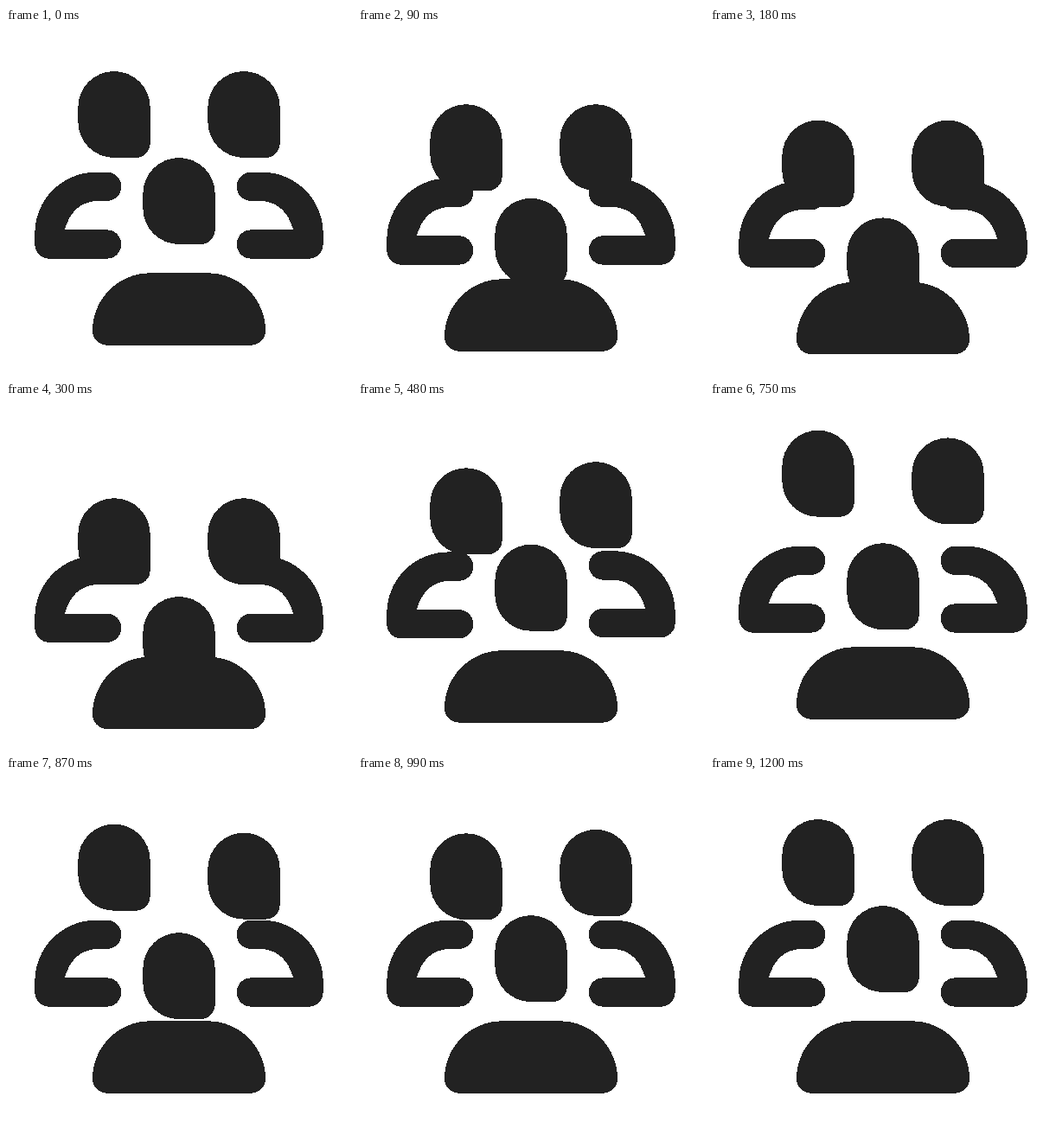
Write an HTML page that moves like this. It is 400 px wide and 400 px high and loops after 3230 ms.

```html
<!DOCTYPE html>
<html lang="en">
<head>
<meta charset="utf-8">
<title>People</title>
<style>
html, body { margin: 0; width: 100%; height: 100%; overflow: hidden; background: #fff; }
svg { display: block; width: 100%; height: 100%; fill: #222; shape-rendering: crispEdges; }
</style>
</head>
<body>
<svg viewBox="0 0 400 400">
  <defs>
    <path id="head" d="M0 2.5a2.5 2.5 0 0 1 5 0V5a1 1 0 0 1-1 1H2.5A2.5 2.5 0 0 1 0 3.5z"/>
    <path id="arm" d="M7 10a1 1 0 0 1 0 2H6.2Q4.6 12.15 4.07 14H7a1 1 0 0 1 0 2H3a1 1 0 0 1-1-1V14.25A4.25 4.25 0 0 1 6.25 10z"/>
  </defs>
  <g id="headL"><use href="#head" transform="scale(16.6667) translate(5 3)"/></g>
  <g id="headR"><use href="#head" transform="scale(16.6667) translate(14 3)"/></g>
  <g id="headM"><use href="#head" transform="scale(16.6667) translate(9.5 9)"/></g>
  <g id="bodyL"><use href="#arm" transform="scale(16.6667)"/></g>
  <g id="bodyR"><use href="#arm" transform="translate(400 0) scale(-16.6667 16.6667)"/></g>
  <g id="bodyM"><path transform="scale(16.6667)" d="M10 17h4a4 4 0 0 1 4 4a1 1 0 0 1-1 1H7a1 1 0 0 1-1-1a4 4 0 0 1 4-4z"/></g>
</svg>
<script>
const LOOP = 3230, TICK = 30;

// Easing from the x values of a curve with flat ends (y = 0 and 1).
function ease(x1, x2) {
  return x => {
    let lo = 0, hi = 1;
    for (let i = 0; i < 30; i++) {
      const s = (lo + hi) / 2, r = 1 - s;
      if (3 * r * r * s * x1 + 3 * r * s * s * x2 + s * s * s < x) lo = s;
      else hi = s;
    }
    return lo * lo * (3 - 2 * lo);
  };
}

const smooth = ease(1 / 3, 2 / 3), press = ease(1 / 3, 0), spring = ease(0.26, 0.67);

// Each step: time in ms, vertical offset in px, easing towards it.
const tracks = {
  headL: [[0, 0], [300, 61.2, press], [720, -18.8, spring], [960, 17, smooth], [1200, 0, smooth]],
  headR: [[0, 0], [300, 61.2, press], [667, -19.2, spring], [900, 17.3, smooth], [1140, 0, smooth]],
  headM: [[0, 0], [300, 75, press], [600, -18, smooth], [855, 31.5, smooth], [1080, 0, smooth]],
  bodyL: [[0, 0], [300, 11.2, press], [720, 0, smooth]],
  bodyR: [[0, 0], [300, 11.2, press], [660, 0, smooth]],
  bodyM: [[0, 0], [300, 11.2, press], [600, 0, smooth]]
};

function offset(steps, t) {
  const i = steps.findIndex(s => s[0] > t);
  if (i < 0) return 0;
  const [t0, y0] = steps[i - 1], [t1, y1, curve] = steps[i];
  return y0 + (y1 - y0) * curve((t - t0) / (t1 - t0));
}

const parts = Object.entries(tracks).map(([id, steps]) => [document.getElementById(id), steps]);
const start = performance.now();

function draw() {
  const now = Math.max(0, performance.now() - start) % LOOP;
  const t = Math.floor(now / TICK) * TICK;
  for (const [el, steps] of parts) {
    el.setAttribute("transform", `translate(0 ${offset(steps, t).toFixed(2)})`);
  }
  requestAnimationFrame(draw);
}
draw();
</script>
</body>
</html>
```
